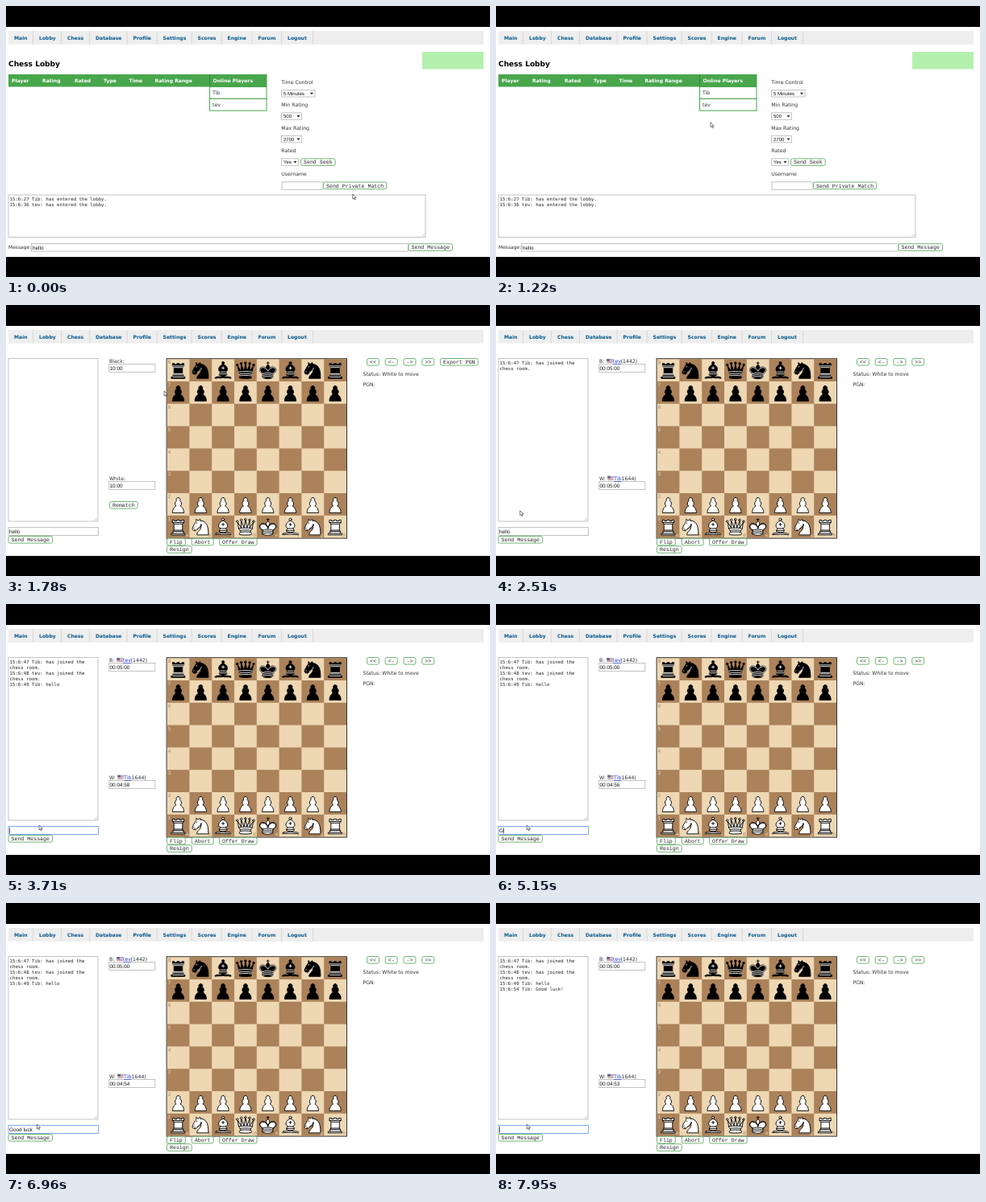
Recreate the animation shown at these times as an HTML page. Size 600x337 px, loop 8 s.

```html
<!DOCTYPE html>
<html lang="en">
<head>
<meta charset="utf-8">
<title>Chess lobby</title>
<style>
  html, body { margin: 0; height: 100%; overflow: hidden; background: #000; }
  svg { display: block; width: 100vw; height: 100vh; }
  text { font: 6.2px "DejaVu Sans", sans-serif; fill: #2c3238; white-space: pre; text-rendering: geometricPrecision; }
  text.nav { font-weight: bold; font-size: 6.1px; fill: #07598f; }
  text.head { font-weight: bold; font-size: 6.1px; fill: #fff; }
  text.title { font-weight: bold; font-size: 9.05px; fill: #000; }
  text.btn { font: 6.6px "Liberation Mono", monospace; fill: #222; }
  text.field { font: 6.4px "Liberation Sans", sans-serif; fill: #111; }
  text.pick { font: 6px "Liberation Sans", sans-serif; fill: #111; }
  text.log { font: 5.72px "DejaVu Sans Mono", monospace; fill: #222; }
  text.link { fill: #1a35d8; text-decoration: underline; }
  text.coord { font: 6.2px "Liberation Sans", sans-serif; }
</style>
</head>
<body>
<svg id="stage" viewBox="0 0 600 337" preserveAspectRatio="none"></svg>
<script>
const LOOP = 8000;
const HOST = 'Tib', GUEST = 'tev';
const LIGHT = '#eed7b3', DARK = '#ab825a';

const rect = (x, y, w, h, fill, more = '') =>
  `<rect x="${x}" y="${y}" width="${w}" height="${h}" fill="${fill}" ${more}/>`;
const esc = s => s.replace(/&/g, '&amp;').replace(/</g, '&lt;').replace(/>/g, '&gt;');
const text = (x, y, s, cls = '', more = '') =>
  `<text x="${x}" y="${y}" class="${cls}" ${more}>${esc(s)}</text>`;
const path = (d, fill, more = '') => `<path d="${d}" fill="${fill}" ${more}/>`;
const group = (id, body) => `<g id="${id}">${body}</g>`;
const box = (x, y, w, h, more = '') =>
  rect(x + .5, y + .5, w - 1, h - 1, '#fff', `stroke="#b4b4b4" stroke-width=".8" ${more}`);
const button = (x, y, s) =>
  rect(x + .5, y + .5, s.length * 3.96 + 7, 8.6, '#fff', 'rx="2" stroke="#5eae63" stroke-width=".9"') +
  text(x + 4, y + 7, s, 'btn');
const picker = (x, y, w, s) => box(x, y, w, 9.5) + text(x + 3, y + 7, s, 'pick') +
  path(`M${x + w - 6.5} ${y + 3.7}h4l-2 2.6z`, '#222');
const area = (x, y, w, h) => box(x, y, w, h) +
  path(`M${x + w - 5} ${y + h - 1.5}l3.5-3.5m-1.5 3.5l1.5-1.5`, 'none', 'stroke="#999" stroke-width=".5"');
const lines = (x, y, list) => list.map((s, i) => text(x, y + i * 7.05, s, 'log')).join('');
const flag = (x, y) => {
  let s = rect(x, y, 7.5, 5, '#e9dfe2');
  for (let i = 0; i < 4; i++) s += rect(x, y + i * 1.4, 7.5, .7, '#b9808a');
  return s + rect(x, y, 3.6, 2.8, '#56648f');
};

// Each piece: outline, then inner lines; drawn on a 45 unit square.
const pieces = {
  P: ['M22.5 9c-2.2 0-4 1.8-4 4 0 .9.3 1.7.8 2.4C17.3 16.5 16 18.6 16 21c0 2 .9 3.8 2.4 5-3 1.1-7.4 5.6-7.4 13.5h23c0-7.9-4.4-12.4-7.4-13.5 1.5-1.2 2.4-3 2.4-5 0-2.4-1.3-4.5-3.3-5.6.5-.7.8-1.5.8-2.4 0-2.2-1.8-4-4-4z', ''],
  R: ['M9 39h27v-3h-3v-4l-2-2.5V17l3-3V9h-4v2h-5V9h-5v2h-5V9h-4v5l3 3v12.5L12 32v4H9z',
      'M12 36h21M12.5 32h20M14 29.5h17M14 17h17M11 14h23'],
  N: ['M22 10c10.5 1 16.5 8 16 29H15c0-9 10-6.5 8-21l1 0c.4 2.9-5.5 7.4-8 9-3 2-2.8 4.3-5 4-1-.9 1.4-3 0-3-1 0 .2 1.2-1 2-1 0-4 1-4-4 0-2 6-12 6-12s1.9-1.9 2-3.5c-.7-1-.5-2-.5-3 1-1 3 2.5 3 2.5h2s.8-2 2.5-3c1 0 1 3 1 3z',
      'M8.7 25.5h.6M14.2 16.2l.6-1.2M24 18c.4 2.9-5.5 7.4-8 9'],
  B: ['M9 36c3.4-1 10.1.4 13.5-2 3.4 2.4 10.1 1 13.5 2 0 0 1.7.5 3 2-.7 1-1.7 1-3 .5-3.4-1-10.1.5-13.5-1-3.4 1.5-10.1 0-13.5 1-1.4.5-2.3.5-3-.5 1.4-1.9 3-2 3-2zM15 32c2.5 2.5 12.5 2.5 15 0 .5-1.5 0-2 0-2 0-2.5-2.5-4-2.5-4 5.5-1.5 6-11.5-5-15.5-11 4-10.5 14-5 15.5 0 0-2.5 1.5-2.5 4 0 0-.5.5 0 2zM25 8a2.5 2.5 0 1 1-5 0 2.5 2.5 0 1 1 5 0z',
      'M17.5 26h10M15 30h15m-7.5-14.5v5M20 18h5'],
  Q: ['M9 26l-2-12 7 11V11l5.5 13.5 3-15 3 15 5.5-13.5v14l7-11-2 12c0 2-1.5 2-2.5 4-1 1.5-1 1-.5 3.5 1.5 1 1 2.5 1 2.5 1.5 1.5 0 2.5 0 2.5-6.5 1-16.5 1-23 0 0 0-2-1-.5-2.5 0 0 0-1.5 1.5-2.5.5-2.5.5-2-.5-3.5-1-2-2.5-2-2.5-4z' +
      [[6, 12], [14, 9], [22.5, 8], [31, 9], [39, 12]].map(([x, y]) => `M${x - 2} ${y}a2 2 0 1 1 4 0a2 2 0 1 1-4 0z`).join(''),
      'M9 26c8.5-1.5 18.5-1.5 27 0M11.5 30c3.5-1 18.5-1 22 0M12 33.5c6-1 15-1 21 0'],
  K: ['M22.5 11.6V6M20 8h5M22.5 25s4.5-7.5 3-10.5c0 0-1-2.5-3-2.5s-3 2.5-3 2.5c-1.5 3 3 10.5 3 10.5M11.5 37c5.5 3.5 15.5 3.5 21 0v-7s9-4.5 6-10.5c-4-6.5-13.5-3.5-16 4V27v-3.5c-3.5-7.5-13-10.5-16-4-3 6 5 10 5 10z',
      'M11.5 30c5.5-3 15.5-3 21 0m-21 3.5c5.5-3 15.5-3 21 0m-21 3.5c5.5-3 15.5-3 21 0M32 29.5s8-4 6-9.6C34 14 25 18 22.5 24.5 20 18 11 14 7 19.9c-2.5 5.6 6 9.6 6 9.6']
};

function board() {
  const X = 199.6, Y = 67.2, S = 27.8;
  let s = rect(X - .5, Y - .5, S * 8 + 1, S * 8 + 1, LIGHT, 'stroke="#333"');
  for (let r = 0; r < 8; r++) for (let c = 0; c < 8; c++) {
    const x = X + c * S, y = Y + r * S, odd = (r + c) % 2;
    if (odd) s += rect(x, y, S, S, DARK);
    const ink = `style="fill:${odd ? LIGHT : DARK}"`;
    if (!c) s += text(x + 1.2, y + 6.2, String(8 - r), 'coord', ink);
    if (r === 7) s += text(x + S - 4.6, y + S - 1.4, 'abcdefgh'[c], 'coord', ink);
    const kind = r === 1 || r === 6 ? 'P' : r % 7 ? '' : 'RNBQKBNR'[c];
    if (!kind) continue;
    const [body, inner] = pieces[kind], white = r > 4;
    s += `<g transform="translate(${x} ${y}) scale(${S / 45})" stroke-width="1.5" stroke-linecap="round" stroke-linejoin="round">` +
      path(body, white ? '#fff' : '#000', 'stroke="#000"') +
      path(inner, 'none', `stroke="${white ? '#000' : '#eee'}"`) + '</g>';
  }
  return s;
}

function page() {
  const names = ['Main', 'Lobby', 'Chess', 'Database', 'Profile', 'Settings', 'Scores', 'Engine', 'Forum', 'Logout'];
  const left = [10, 41, 76, 111, 157.5, 194.5, 237.5, 274.5, 312.5, 349];
  const ends = [...left.slice(1).map(x => x - 7.7), 380.3];
  return rect(0, 0, 600, 337, '#000') + rect(0, 26, 600, 286, '#fff') + rect(3, 31, 589, 16.7, '#eee') +
    names.map((s, i) => text(left[i], 42, s, 'nav') + rect(ends[i], 31, .6, 16.7, '#ccc')).join('');
}

function lobby() {
  const heads = [['Player', 7], ['Rating', 45], ['Rated', 85], ['Type', 121], ['Time', 152.5], ['Rating Range', 184.5], ['Online Players', 256.5]];
  const labels = ['Time Control', 'Min Rating', 'Max Rating', 'Rated', 'Username'];
  return text(3, 75, 'Chess Lobby', 'title') +
    rect(516, 57, 76, 21.5, '#b3f0ad') +
    rect(3, 85, 320.5, 15.5, '#48a64b') + rect(252, 85, .8, 15.5, '#2c7d31') +
    heads.map(([s, x]) => text(x, 95.2, s, 'head')).join('') +
    rect(252.5, 100.5, 70.5, 14.8, '#fff', 'stroke="#48a64b"') +
    rect(252.5, 115.3, 70.5, 14.8, '#fff', 'stroke="#48a64b"') +
    text(256, 110.2, HOST) + text(256, 125.2, GUEST) +
    labels.map((s, i) => text(341.3, 97 + i * 28.4, s)).join('') +
    picker(341, 104, 42.5, '5 Minutes') + picker(341, 132.3, 26, '500') +
    picker(341, 160.8, 26, '2700') + picker(341, 189.3, 22, 'Yes') +
    button(365, 189.3, 'Send Seek') + box(341.5, 218.3, 52, 10.5) + button(393, 218.5, 'Send Private Match') +
    area(2.5, 234.5, 518, 53.5) +
    lines(4.5, 242.2, [`15:6:27 ${HOST}: has entered the lobby.`, `15:6:36 ${GUEST}: has entered the lobby.`]) +
    group('lost', text(4.5, 256.3, '15:6:47 Connection lost. Please refresh to reconnect.', 'log')) +
    text(3, 302, 'Message:', '', 'style="font-size:6px"') + box(31, 295, 468, 10.5) + text(33, 302.6, 'hello', 'field') +
    button(498.5, 295.2, 'Send Message');
}

function game() {
  const person = (y, side, name, rating, x) => text(128, y, side) + flag(x, y - 5.2) +
    text(x + 7.8, y, name, 'link') + text(x + 17.3, y, rating);
  return area(2.5, 66, 112, 203.5) +
    group('join1', lines(4.5, 73.8, [`15:6:47 ${HOST}: has joined the`, 'chess room.'])) +
    group('join2', lines(4.5, 87.9, [`15:6:48 ${GUEST}: has joined the`, 'chess room.'])) +
    group('said1', lines(4.5, 102, [`15:6:49 ${HOST}: hello`])) +
    group('said2', lines(4.5, 109.05, [`15:6:54 ${HOST}: Good luck!`])) +
    box(2.5, 276, 112.5, 11, 'id="entry"') + text(4, 284, '', 'field', 'id="typed"') +
    rect(0, 278.2, .7, 7.2, '#111', 'id="caret"') +
    button(2.5, 287, 'Send Message') +
    box(127.3, 73, 58, 11) + box(127.3, 219, 58, 11) +
    text(128.5, 80.9, '', 'field', 'id="blackClock"') + text(128.5, 226.9, '', 'field', 'id="whiteClock"') +
    group('waiting', text(128, 72.3, 'Black:') + text(128, 218, 'White:') +
      button(128, 244, 'Rematch') + button(538, 66, 'Export PGN')) +
    group('seated', person(72.3, 'B:', GUEST, '(1442)', 137.3) + person(218, 'W:', HOST, '1644)', 138.3)) +
    board() +
    button(199, 289.8, 'Flip') + button(229.8, 289.8, 'Abort') + button(264, 289.8, 'Offer Draw') + button(199, 299.2, 'Resign') +
    button(447, 66, '<<') + button(469.7, 66, '<-') + button(492.5, 66, '->') + button(515.3, 66, '>>') +
    text(442.5, 87.5, 'Status: White to move') + text(442.5, 101.3, 'PGN:');
}

const stage = document.getElementById('stage');
stage.innerHTML = page() + group('lobby', lobby()) + group('game', game()) +
  path('M0 0v6l1.4-1.3 1 2.2 1-.4-1-2.1h1.9z', '#fff', 'id="pointer" stroke="#222" stroke-width=".6"');
const el = id => document.getElementById(id);
const show = (id, on) => el(id).setAttribute('visibility', on ? 'inherit' : 'hidden');

// Last value whose time has come.
const at = (steps, t) => steps.reduce((v, s) => t >= s[0] ? s[1] : v, steps[0][1]);

const typing = [[0, 'hello'], [3710, ''], [5150, 'G'], [5400, 'Go'], [5660, 'Goo'], [5990, 'Good'], [6050, 'Good '],
  [6180, 'Good l'], [6310, 'Good lu'], [6370, 'Good luc'], [6430, 'Good luck'], [7220, 'Good luck!'], [7950, '']];
const blink = [[0, false], [2990, true], [3510, false], [3710, true], [4220, false], [4750, true],
  [6960, false], [7220, true], [7750, false], [7950, true]];
const clock = [[0, '10:00'], [2020, '00:05:00'], [2750, '00:04:58'], [3770, '00:04:57'], [4750, '00:04:56'],
  [5730, '00:04:55'], [6760, '00:04:54'], [7750, '00:04:53']];
const moves = [[0, 429.8, 234], [400, 429.8, 234], [401, 429.3, 233.5], [800, 429.3, 233.5], [1460, 195.8, 106.5],
  [1780, 196, 107], [2450, 29.8, 255.7], [2510, 29.8, 255.7], [2990, 35, 280],
  [3190, 35, 280], [3250, 41, 275], [3710, 41, 275], [3960, 38.3, 275], [LOOP, 38.3, 275]];

function pointer(t) {
  const i = moves.findIndex(m => m[0] > t);
  const [t0, x0, y0] = moves[i - 1], [t1, x1, y1] = moves[i];
  const u = (t - t0) / (t1 - t0), k = u * u * (3 - 2 * u);
  return `translate(${x0 + (x1 - x0) * k} ${y0 + (y1 - y0) * k})`;
}

function draw(now) {
  const t = now % LOOP, playing = t >= 1780, seated = t >= 2020;
  el('lobby').style.display = playing ? 'none' : '';
  el('game').style.display = playing ? '' : 'none';
  show('lost', t >= 1660);
  show('waiting', !seated);
  show('seated', seated);
  show('join1', seated);
  show('join2', t >= 2750);
  show('said1', t >= 3710);
  show('said2', t >= 7950);
  el('blackClock').textContent = seated ? '00:05:00' : '10:00';
  el('whiteClock').textContent = at(clock, t);
  el('entry').setAttribute('stroke', t >= 2990 ? '#5b94f5' : '#b4b4b4');
  el('typed').textContent = at(typing, t);
  show('caret', at(blink, t));
  if (playing) el('caret').setAttribute('x', 4.2 + el('typed').getComputedTextLength());
  el('pointer').setAttribute('transform', pointer(t));
}

let start;
function tick(now) {
  start ??= now;
  draw(now - start);
  requestAnimationFrame(tick);
}
draw(0);
requestAnimationFrame(tick);
</script>
</body>
</html>
```
